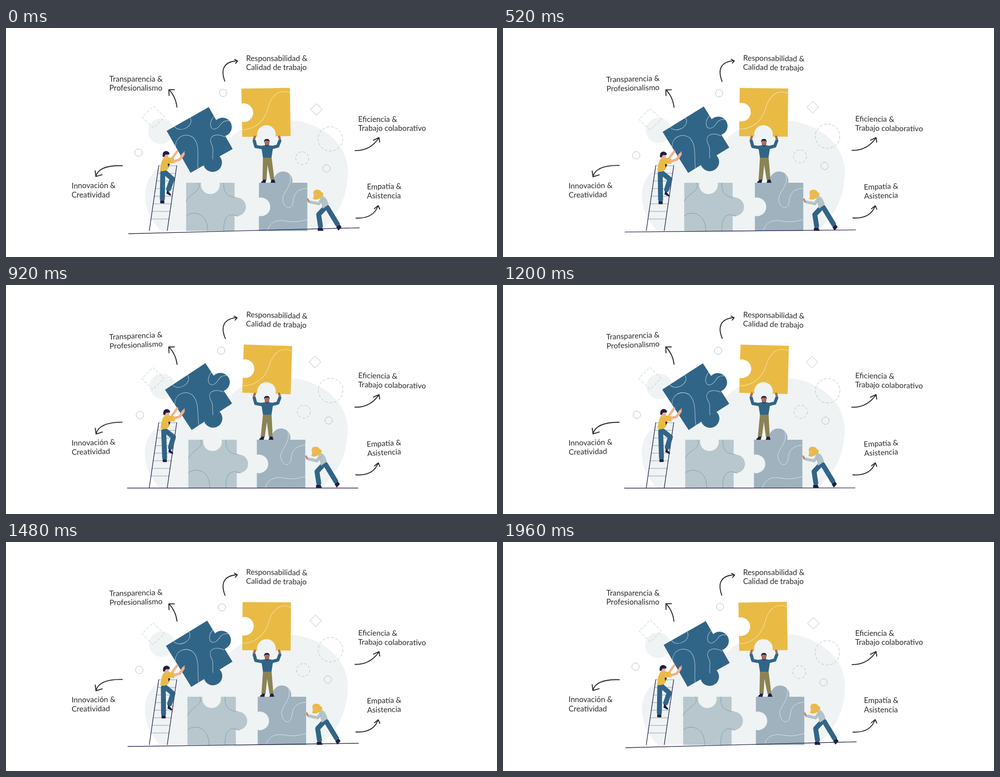
An HTML page for the animation above (2 s loop, 1093 by 512 pixels).

```html
<!DOCTYPE html>
<html lang="es">
<head>
<meta charset="utf-8">
<title>Valores del equipo</title>
<style>
  html, body { margin: 0; width: 100%; height: 100%; overflow: hidden; background: #fff; }
  svg { display: block; width: 100%; height: 100%; }
  text { font: 17px Lato, sans-serif; fill: #2b2b2b; }
  .line { fill: none; stroke-linecap: round; stroke-linejoin: round; }
  .arrow { stroke: #2b2b2b; stroke-width: 2.1; }
  .thin { fill: none; stroke: #a9bac3; stroke-width: 1; }
  .dash { stroke-dasharray: 6 4; }
  .pale { fill: #eff3f4; }
  .blue { fill: #316588; }
  .yellow { fill: #e9bb45; }
  .navy { fill: #211d46; }
  .tan { fill: #f0b18c; }
  .brown { fill: #aa6b50; }
  .olive { fill: #8b8353; }
  .limb { stroke: #316588; stroke-width: 11; }
</style>
</head>
<body>
<!-- data-move: dx dy turn pivotX pivotY, reached at the far end of the swing -->
<svg viewBox="0 0 1093 512">
  <path class="pale" data-move="-.5 2" d="M345 453C300 410 295 340 345 310C400 282 450 300 490 256C530 206 600 200 650 208C730 224 765 280 761 330C757 390 735 420 700 453Z"/>
  <circle class="pale" data-move="3.2 -4.5" cx="345" cy="231" r="28.5"/>

  <g class="thin">
    <path class="dash" data-move="-1 10.5" d="M328 174.5l25 24.5-25 24.5-25-24.5z"/>
    <circle class="dash" data-move=".7 -12.5" cx="722" cy="248" r="27.3"/>
    <circle class="dash" data-move="3.6 -8.2" cx="659.5" cy="291" r="14.5"/>
    <circle data-move="-4.6 2" cx="483.3" cy="145" r="8.2"/>
    <circle data-move="3.2 12.8" cx="295" cy="278.5" r="8.3"/>
    <circle data-move="4.8 -11.5" cx="713.5" cy="314" r="8.2"/>
    <path data-move="-3.2 -10.3" d="M691 169l13 13-13 13-13-13z"/>
  </g>

  <g id="ladder" class="line"></g>

  <g data-move="5 0"><g class="piece" transform="translate(401 346)" data-edges="-1 1 0 0" fill="#b8c7cd" stroke="#7d98a6">
    <path d="M27 0C38 18 6 24 0 42M0 74C15 62 48 66 48 108M84 0C82 22 92 32 112 33M84 108C82 80 92 64 116 75"/>
  </g></g>
  <g data-move="-4.7 0"><g class="piece" transform="translate(563 346)" data-edges="1 0 0 -1" fill="#9fb2be" stroke="#e3ebee">
    <path d="M69-20C76 12 48 22 54 42C58 58 72 62 76 44C78 22 86 14 108 12M19 108C24 86 42 82 62 86C84 90 98 84 108 82"/>
  </g></g>
  <g data-move="0 0 2.8 579 242"><g class="piece" transform="translate(524 135.6) rotate(-1)" data-edges="0 0 -1 -1" fill="#e9bb45" stroke="#f7e7bd">
    <path d="M0 92C28 92 50 74 58 46C66 14 86 2 108 11"/>
  </g></g>
  <g data-move="2.6 .5 -3.9 410.5 323.5"><g class="piece" transform="translate(357.6 230) rotate(-29.6)" data-edges="0 1 1 0" fill="#316588" stroke="#bfd0dc">
    <path d="M20 0C22 20 60 22 60 0M0 40C10 22 34 22 44 42C50 64 30 84 19 108M108 24C88 30 84 50 100 50C112 50 118 38 133 50M106 76C92 56 74 56 72 76C72 88 64 92 58 106"/>
  </g></g>

  <path data-move="-3 0" data-floor stroke="#211d46" stroke-width="1.4"/>

  <!-- climber -->
  <g data-move="2 3">
    <g data-move="0 1 -3 350 320">
      <path class="line limb" d="M349 323L348 382M354 323L370 337L362 360"/>
      <path class="navy" d="M343 386h9.500v6h-9zM359 362l9 11-2 2-9-5z"/>
    </g>
  </g>
  <path class="line" stroke="#f0b18c" stroke-width="5" d="M370 291L381 276"/>
  <g data-move="1.5 2.5">
    <path class="yellow" d="M350 291Q344 300 343 319Q350 322 359 317Q365 309 365 302L374 303L374 291L361 289Z"/>
    <path class="navy" d="M360 303l5 1-4 7z"/>
    <circle class="tan" cx="356" cy="286" r="5.8"/>
    <path class="navy" d="M349 288Q347 276 356 275Q361 275 364 280L363 283L355 283L352 288Z"/>
  </g>
  <path class="line" stroke="#f0b18c" stroke-width="6" d="M374 298L387 294L395 282"/>
  <path class="line" stroke="#f0b18c" stroke-width="2" d="M393 285L397 277"/>

  <!-- carrier -->
  <g data-skew="-4.5 290 345">
    <path class="olive" d="M572 288L571 340H580L582 306L589 340L597.500 339L591 288Z"/>
    <path class="navy" d="M572 339h7l-1 7h-10q0-3 4-5zM591 339h6l3 7h-11z"/>
  </g>
  <path class="line" stroke="#316588" stroke-width="7" d="M573 268L556 265L552.500 252M589 268L605 264L609.500 252"/>
  <path class="blue" d="M568 263.500L577 262H586L595 264L591 290H572Z"/>
  <path class="line" stroke="#aa6b50" stroke-width="5" d="M552 248L554 243M609.500 248L608 243"/>
  <ellipse class="brown" cx="581" cy="257" rx="5.300" ry="6.500"/>
  <path class="navy" d="M575 256Q573 248 581 248Q588 248 586.500 256L585 252H577Z"/>
  <path fill="#5a3140" d="M576.500 259Q581 262 585.500 259Q584 265 581 265Q578 265 576.500 259Z"/>
  <path stroke="#efc8b5" d="M579 261h4"/>

  <!-- pusher -->
  <g data-move="-3.9 0">
    <path class="line limb" stroke-linecap="butt" d="M715 401L738 439M710 402L696 417L700 443"/>
    <path class="navy" d="M694 447h10l3 6.500h-13zM735 445l8-5 4 5-7 8z"/>
    <path fill="#b5c3c9" d="M698 376Q713 372 718 395L705 404Z"/>
    <path class="line" stroke="#b5c3c9" stroke-width="6.500" d="M704 381L696 393L677 389"/>
    <path class="line" stroke="#8fa5b0" stroke-width=".8" d="M705 382Q703 392 695 396"/>
    <path class="line" stroke="#c87f68" stroke-width="4" d="M672 383L674 388"/>
    <path class="yellow" d="M684 370Q684 361 693 361.500Q701 362 702 367Q708 368 706 375Q700 378 698 381Q691 386 683 382Q687 376 684 370Z"/>
    <ellipse class="tan" cx="690" cy="371" rx="4" ry="4.800" transform="rotate(18 690 371)"/>
    <path class="yellow" d="M684 370Q688 362 697 366L695 376Q692 366 684 370Z"/>
  </g>

  <g class="line arrow">
    <path data-move="0 0 -3 500 96" d="M487 119C477 91 486 75 515 73.500M509 70L515.500 74L511 79"/>
    <path data-move="0 .5 -1 371 157" d="M380.500 177Q378 154 363 138M363 151L362.500 138L375 138"/>
    <path data-move="0 0 -2.500 229 319" d="M259 308Q208 306 200 331M198.500 319L200 332L214 328"/>
    <path data-move="0 0 1 831 245" d="M777 274Q810 275 830 246M818 251L830.500 245L832 255"/>
    <path data-move="0 0 1.500 804 411" d="M779 425Q817 427 828 398M820 404L828.500 397L832 405"/>
  </g>

  <g id="labels"></g>
</svg>
<script>
const make = (parent, tag, attrs, content = "") => {
  const node = document.createElementNS("http://www.w3.org/2000/svg", tag);
  for (const key in attrs) node.setAttribute(key, attrs[key]);
  node.textContent = content;
  return parent.appendChild(node);
};
const all = selector => [...document.querySelectorAll(selector)];

// Jigsaw outline; each edge is 1 (tab), -1 (notch) or 0 (straight).
const SIDE = 107.8, RADIUS = 20.8, OFFSET = 4.5;
function outline(edges) {
  const half = Math.sqrt(RADIUS ** 2 - OFFSET ** 2), mid = SIDE / 2;
  const steps = [[1, 0], [0, 1], [-1, 0], [0, -1]];
  return "M0 0" + edges.map((edge, i) => {
    const [x, y] = steps[i];
    const rel = d => `l${x * d} ${y * d}`;
    if (!edge) return rel(SIDE);
    return rel(mid - half) +
      `a${RADIUS} ${RADIUS} 0 1 ${edge > 0 ? 1 : 0} ${x * 2 * half} ${y * 2 * half}` +
      rel(mid - half);
  }).join("") + "z";
}
for (const piece of all(".piece")) {
  const detail = piece.firstElementChild;
  detail.setAttribute("fill", "none");
  const body = make(piece, "path", { d: outline(piece.dataset.edges.split(" ").map(Number)), stroke: "none" });
  piece.insertBefore(body, detail);
}

const ladder = document.querySelector("#ladder");
for (let y = 308; y < 440; y += 17) {
  const x = 340 - (y - 308) * 0.145;
  make(ladder, "path", { d: `M${x} ${y}h40`, stroke: "#b9c6cc", "stroke-width": 2 });
}
make(ladder, "path", { d: "M340 308L319 453M380 308L359 453", stroke: "#211d46", "stroke-width": 1.4 });

const labels = [
  [230, 120, -2.7, "Transparencia &", "Profesionalismo"],
  [534.5, 74, 1.5, "Responsabilidad &", "Calidad de trabajo"],
  [784, 210, 1.2, "Eficiencia &", "Trabajo colaborativo"],
  [803.5, 360.5, -3.1, "Empatía &", "Asistencia"],
  [146, 358.5, -1.5, "Innovación &", "Creatividad"]
];
for (const [x, y, turn, ...lines] of labels) {
  const group = make(document.querySelector("#labels"), "g", {});
  lines.forEach((line, i) => make(group, "text", { x, y: y + i * 20.4 }, line));
  const box = group.getBBox();
  group.dataset.move = `0 -.5 ${turn} ${box.x + box.width / 2} ${y + 4}`;
}

const movers = all("[data-move]").map(node => [node, node.dataset.move.split(" ").map(Number)]);
const floor = document.querySelector("[data-floor]");
const legs = document.querySelector("[data-skew]");
const [legShift, hipY, footY] = legs.dataset.skew.split(" ").map(Number);

// Sine swing over a 2 s loop, 1 at the peak time.
const swing = (t, peak) => (1 + Math.cos((t - peak) * Math.PI / 1000)) / 2;

function draw(now) {
  const t = now % 2000;
  const slide = swing(t, 1030), spin = swing(t, 980);
  for (const [node, [dx, dy, turn = 0, cx = 0, cy = 0]] of movers)
    node.setAttribute("transform", `translate(${dx * slide} ${dy * slide}) rotate(${turn * spin} ${cx} ${cy})`);

  const level = swing(t, 960);
  const flat = level * level * (3 - 2 * level);
  floor.setAttribute("d", `M272.5 ${460 - 6 * flat}L787 ${446.7 + 7.3 * flat}`);

  const shear = legShift * slide / (footY - hipY);
  legs.setAttribute("transform", `matrix(1 0 ${shear} 1 ${-shear * hipY} 0)`);
}

const start = performance.now();
function frame() {
  draw(performance.now() - start);
  requestAnimationFrame(frame);
}
frame();
</script>
</body>
</html>
```
